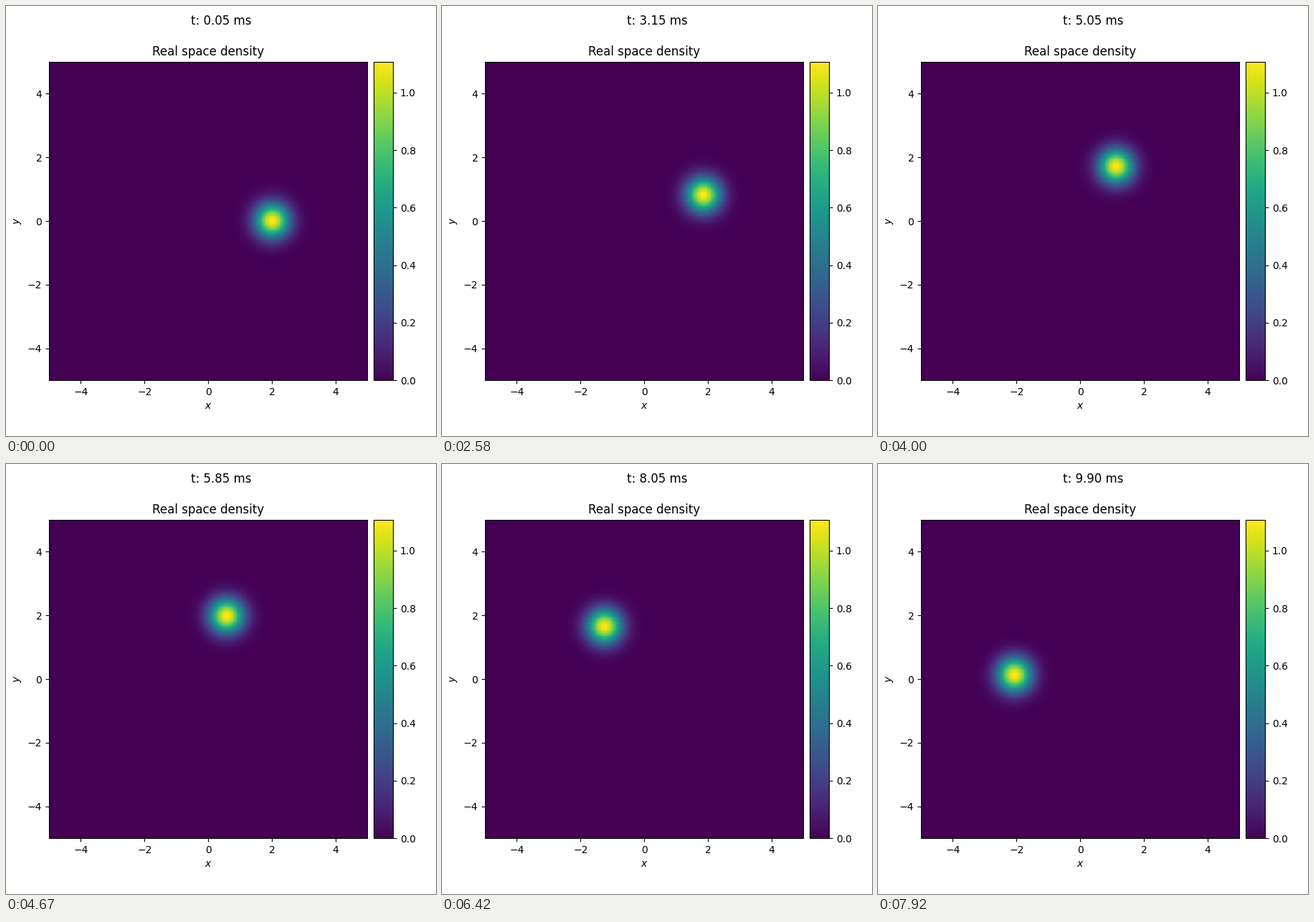
Recreate the animation shown at these times as a matplotlib script. Size 600 by 600 pixels, loop 8000 ms.

```python
import numpy as np
import matplotlib.pyplot as plt
from matplotlib.animation import FuncAnimation

FRAMES = 96
LOOP_MS = 8000
STEP_MS = 40          # playback time per simulation step
DT = 0.05             # simulated ms per step
TURN = 20.0           # simulated ms for one full turn of the trap
LAG = 0.025           # cloud trails the trap slightly
PEAK = 1.107
HALF = 5.0
CELLS = 256

SIDE = 0.8 / 1.08     # square axes, 2% gap, 6% colour bar

edges = np.linspace(-HALF, HALF, CELLS + 1)
grid = (edges[:-1] + edges[1:]) / 2


def centre(t):
    """Cloud position: a smoothstep turn, pushed outward by rotation."""
    s = max(t - LAG, 0) / TURN
    angle = 2 * np.pi * s * s * (3 - 2 * s)
    omega = 2 * np.pi * 6 * s * (1 - s) / TURN
    radius = 2 + 0.32 * omega ** 2
    return radius * np.cos(angle), radius * np.sin(angle)


def density(t):
    cx, cy = centre(t)
    gx = np.exp(-np.pi * PEAK * (grid - cx) ** 2)
    gy = np.exp(-np.pi * PEAK * (grid - cy) ** 2)
    return PEAK * np.outer(gy, gx)


def sim_time(i):
    step = i * LOOP_MS // (FRAMES * STEP_MS) + 1
    return step * DT


fig = plt.figure(figsize=(6, 6), dpi=100)
ax = fig.add_axes([0.1, 0.5 - SIDE / 2, SIDE, SIDE])
cax = fig.add_axes([0.1 + 1.02 * SIDE, 0.5 - SIDE / 2, 0.06 * SIDE, SIDE])

image = ax.imshow(density(DT), cmap="viridis", vmin=0, vmax=PEAK,
                  origin="lower", extent=(-HALF, HALF, -HALF, HALF),
                  interpolation="nearest", aspect="auto")
ax.set_xticks(range(-4, 5, 2))
ax.set_yticks(range(-4, 5, 2))
ax.set_xlabel("$x$")
ax.set_ylabel("$y$")
ax.set_title("Real space density")
fig.colorbar(image, cax=cax)
clock = fig.suptitle("t: 0.05 ms")


def update(i):
    t = sim_time(i)
    image.set_data(density(t))
    clock.set_text(f"t: {t:.2f} ms")
    return image, clock


anim = FuncAnimation(fig, update, frames=FRAMES, interval=LOOP_MS / FRAMES,
                     repeat=True, repeat_delay=0, blit=False)
plt.show()
```
